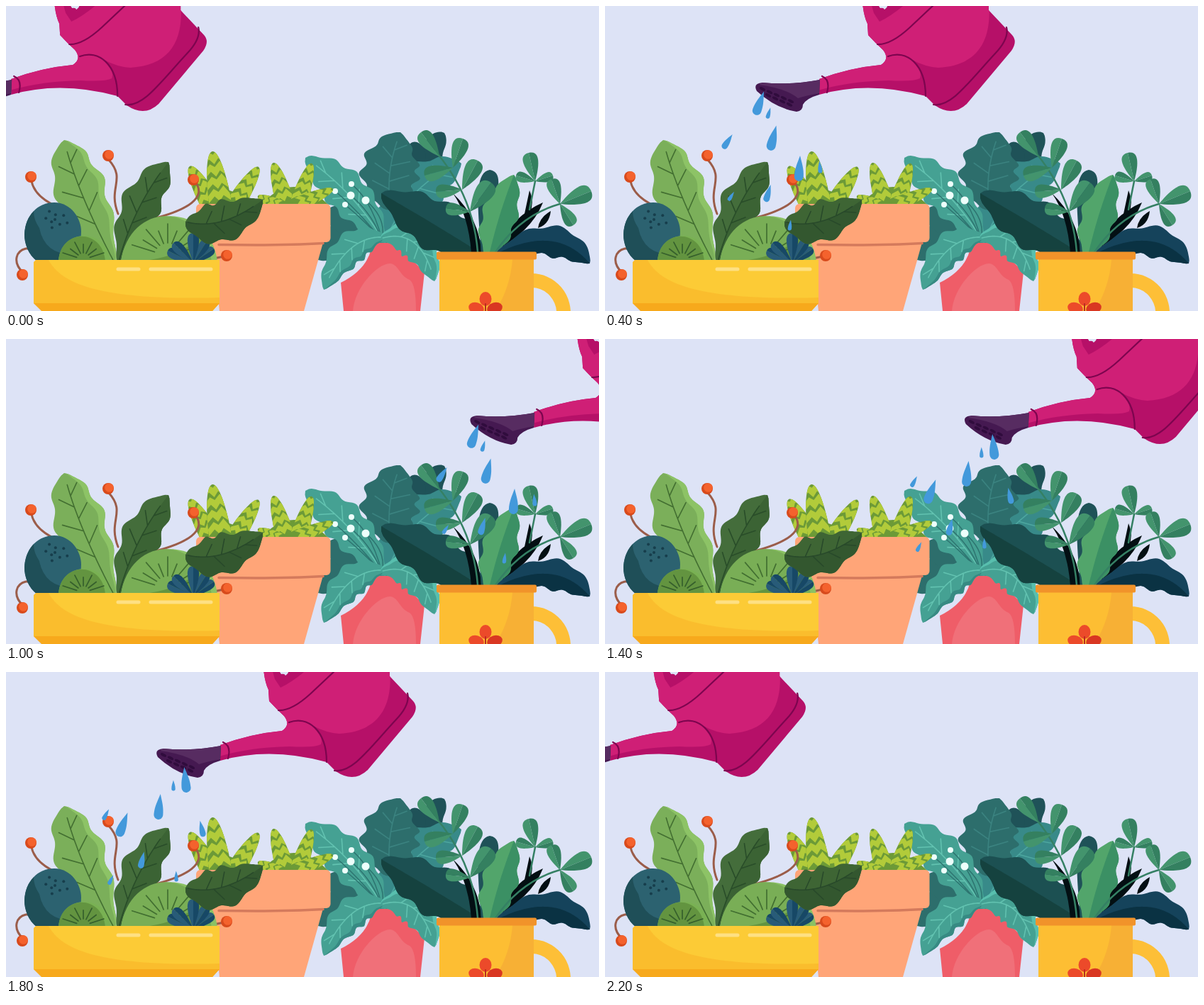
These frames come from a looping animation (836x430 px, 2300 ms). An HTML page:

```html
<!DOCTYPE html>
<html lang="en">
<head>
<meta charset="utf-8">
<title>Watering the plants</title>
<style>
html, body { margin: 0; width: 100%; height: 100%; overflow: hidden; background: #dde3f6; }
svg { display: block; width: 836px; height: 430px; }
</style>
</head>
<body>
<svg id="stage" viewBox="0 0 836 430"></svg>
<script>
const range = n => [...Array(n).keys()];
const repeat = (n, make) => range(n).map(make).join('');
const parse = s => s.split(' ').map(p => p.split(',').map(Number));
const path = (d, fill) => `<path d="${d}" fill="${fill}"/>`;
const line = (d, color, w) => `<path d="${d}" fill="none" stroke="${color}" stroke-width="${w}" stroke-linecap="round"/>`;
const dot = (x, y, r, fill) => `<circle cx="${x}" cy="${y}" r="${r}" fill="${fill}"/>`;
const oval = (x, y, rx, ry, turn, fill) =>
  `<ellipse cx="${x}" cy="${y}" rx="${rx}" ry="${ry}" fill="${fill}" transform="rotate(${turn} ${x} ${y})"/>`;
const rect = (x, y, w, h, r, fill) => `<rect x="${x}" y="${y}" width="${w}" height="${h}" rx="${r}" fill="${fill}"/>`;
const polygon = (points, fill) => path('M' + points.map(p => p.map(v => v.toFixed(1))).join('L') + 'Z', fill);

let clips = 0;
function within(d, base, inner) {
  const id = 'clip' + clips++;
  return `<clipPath id="${id}"><path d="${d}"/></clipPath>${path(d, base)}<g clip-path="url(#${id})">${inner}</g>`;
}

// Lobed leaf along a quadratic spine "base bend tip".
// skew above 1 moves the widest part to the tip; shadeSide 1 is right of the growing direction.
function leaf(spine, width, lobes, fill, { shade, shadeSide = 1, inset = 0, vein, skew = 1, depth = .12 } = {}) {
  const [a, b, c] = parse(spine);
  const at = t => [0, 1].map(k => (1 - t) ** 2 * a[k] + 2 * t * (1 - t) * b[k] + t * t * c[k]);
  const half = t => width * Math.sin(Math.PI * t ** skew) ** .65 * (1 + depth * Math.cos(2 * Math.PI * lobes * t));
  const edge = (t, side, part = 1) => {
    const [p, q, r] = [at(t), at(t - .01), at(t + .01)];
    const [dx, dy] = [r[0] - q[0], r[1] - q[1]];
    const w = side * part * half(t) / Math.hypot(dx, dy);
    return [p[0] - dy * w, p[1] + dx * w];
  };
  const ts = range(61).map(i => i / 60), back = [...ts].reverse();
  let out = polygon([...ts.map(t => edge(t, 1)), ...back.map(t => edge(t, -1))], fill);
  if (shade) out += polygon([...ts.map(t => edge(t, shadeSide)), ...back.map(t => edge(t, shadeSide, inset))], shade);
  if (vein) {
    const side = i => {
      const t = .28 + .1 * i;
      return `M${at(t)}L${edge(t + .1, i % 2 ? 1 : -1, .65)}`;
    };
    out += line(`M${at(.03)}L${ts.slice(3, 54).map(at).join('L')}` + range(6).map(side).join(''), vein, 1.6);
  }
  return out;
}

// Small two-tone leaf growing from a joint to its tip.
function leaflet(x, y, tipX, tipY, light = '#43946d', dark = '#348060', ratio = .27) {
  const len = Math.hypot(tipX - x, tipY - y);
  const turn = Math.atan2(tipX - x, y - tipY) * 180 / Math.PI;
  const half = w => `M0 0C${w * .5} ${-len * .25} ${w * 1.9} ${-len} 0 ${-len}Z`;
  return `<g transform="translate(${x} ${y}) rotate(${turn})">${path(half(-len * ratio), light)}${path(half(len * ratio), dark)}</g>`;
}

// Tapering leaf with bright zigzag bands.
function striped(x, y, tipX, tipY, wide) {
  const len = Math.hypot(tipX - x, tipY - y);
  const turn = Math.atan2(tipX - x, y - tipY) * 180 / Math.PI;
  const shape = `M${-wide} 0C${-wide} ${-len * .5} ${-wide * .6} ${-len} 0 ${-len}S${wide} ${-len * .5} ${wide} 0Z`;
  const band = k => {
    const y0 = -len * (1 - k * .22), h = len * .12;
    return path(`M${-wide} ${y0 + h}L${-wide * .4} ${y0}L0 ${y0 + h * .5}L${wide * .5} ${y0 - h * .3}L${wide} ${y0 + h}V${y0 + h * 2}L${wide * .4} ${y0 + h * 1.1}L0 ${y0 + h * 1.9}L${-wide * .4} ${y0 + h * 1.1}L${-wide} ${y0 + h * 2}Z`, '#b2cb3a');
  };
  return `<g transform="translate(${x} ${y}) rotate(${turn})">${within(shape, '#6c9a37', repeat(4, band))}</g>`;
}

const berry = ([x, y]) => dot(x, y, 8, '#d84a1c') + dot(x + 1.5, y - 1.5, 6.3, '#f4622d');

function fan(x, y, inner, outer, count, color) {
  return line(range(count).map(i => {
    const a = Math.PI * (1.12 + .76 * i / (count - 1));
    const r = i % 2 ? outer * .82 : outer;
    return `M${x + inner * Math.cos(a)} ${y + inner * Math.sin(a)}L${x + r * Math.cos(a) * 1.15} ${y + r * Math.sin(a)}`;
  }).join(''), color, 1.7);
}

function tealPlant() {
  const teal = '#45a193', deep = '#2d6e6c', vein = '#62c2b0';
  const flowers = parse('464,261 478,280 487,251 486,267 507,274');
  return leaf('510,325 470,325 436,356', 24, 2, deep) +
    leaf('545,335 500,310 450,290', 28, 2, deep) +
    leaf('590,265 585,215 618,179', 18, 2, '#1f5258', { skew: 1.5 }) + oval(579, 208, 12, 17, -20, '#1f5258') +
    leaf('530,345 562,250 642,222', 34, 4.5, '#388a89', { vein: '#4da7a0' }) +
    leaf('543,288 533,235 556,178', 39, 4.5, deep, { vein: '#3b8380' }) +
    leaf('534,334 490,260 422,214', 28, 5, teal, { vein, skew: 1.1 }) +
    line(flowers.map(([x, y]) => `M${x} ${y}Q${x + 30} ${y + 25} 530 330`).join(''), '#2d7470', 1.5) +
    flowers.map(([x, y], i) => dot(x, y, i < 3 ? 4 : 5.5, '#edfffb')).join('') +
    path('M472 390Q508 372 515 342Q518 334 526 334H545Q553 334 556 342L590 375L584 430H476Z', '#ef5d68') +
    path('M489 430C492 395 525 363 541 363C554 364 554 380 569 386Q578 392 578 430Z', '#f07079') +
    leaf('534,326 480,322 448,400', 22, 4.5, teal, { shade: '#378a83', shadeSide: -1, inset: .7, vein }) +
    leaf('528,328 585,310 604,388', 23, 4.5, teal, { shade: '#58bfae', shadeSide: -1, inset: .65, vein });
}

function stripedPlants() {
  return path('M272 282Q305 235 343 282Z', '#6c9a37') +
    striped(290, 282, 259, 226, 14) + striped(320, 284, 356, 227, 13) + striped(303, 284, 291, 205, 16) +
    path('M358 282Q405 228 456 282Z', '#6c9a37') +
    striped(395, 282, 377, 221, 13) + striped(411, 282, 431, 222, 12) +
    striped(405, 282, 461, 258, 10) + striped(390, 284, 355, 268, 9);
}

function orangePot() {
  return path('M290 330H448L420 430H301Z', '#ffa578') + rect(268, 279, 189.5, 54, 6, '#ffa578') +
    line('M300 336.5Q390 338 447 334.5', '#d47a5c', 3.5);
}

function leftPlants() {
  const brown = '#9b5d4a';
  const stems = 'M36 247Q40 266 64 279M145 217C170 245 143 255 158 293M266 247C285 270 255 288 207 300' +
    'M24 376C8 360 15 345 28 342Q45 341 60 358M312 352L288 357';
  const seed = i => {
    const a = i * 2.4, r = 6.5 * Math.sqrt(i);
    return dot(69 + r * Math.cos(a), 301 + r * .75 * Math.sin(a), 2, '#173e4c');
  };
  const sprout = (x, y) => leaflet(264, 362, x, y, '#285b78', '#174866', .2);
  return line(stems, brown, 3) +
    leaf('154,364 98,258 82,189', 34, 3.5, '#7baf5a', { shade: '#8dc366', inset: .72, vein: '#436f31', skew: 1.15 }) +
    leaf('158,364 178,285 229,220', 26, 3.5, '#446d3b', { shade: '#3b6334', vein: '#294d29', skew: 1.3, depth: .16 }) +
    within('M68 277C92 277 106 300 106 318Q106 345 86 360H44C31 350 26 335 26 322C27 295 45 277 68 277Z', '#2c6270',
      path('M44 275Q33 292 47 313Q55 352 97 350L80 370H20V280Z', '#1f4f58')) + repeat(9, seed) +
    path('M74 360C76 314 142 310 147 360Z', '#79b153') + path('M74 360C76 314 136 312 140 360Z', '#639440') +
    fan(109, 358, 10, 27, 7, '#36602c') +
    path('M162 360C174 278 286 272 298 360Z', '#8bc164') +
    within('M162 360C174 278 272 272 290 360Z', '#79ae56', path('M182 360Q250 356 280 318V360Z', '#639440')) +
    fan(228, 354, 20, 47, 9, '#426f31') +
    sprout(228, 345) + sprout(236, 334) + sprout(293, 342) + sprout(284, 330) + sprout(264, 320) +
    leaf('253,304 304,318 362,273', 28, 3.5, '#3e6534', { shade: '#33572f', vein: '#28492a', skew: .9 }) +
    parse('35,241 144,211 264,245').map(berry).join('');
}

function planter() {
  return path('M42 358H301V419L291 430H51L39 419V361Z', '#fabd2d') +
    path('M60 358H301V411C150 415 80 397 60 358Z', '#fccb36') +
    path('M39 419H301L291 430H50Z', '#f7a91c') +
    line('M158 371H187M204 371H289', '#fee083', 5) + parse('23,379 311,352').map(berry).join('');
}

function rightPlants() {
  const stem = '#358064', black = '#030f13';
  // Pairs of leaves climb the left stem, turning as they go up.
  const pair = k => {
    const [x, y] = [654 - 10 * k - k * k, 290 - 31 * k];
    return leaflet(x, y, x - 34 - 3 * k, y - 5 + 8 * k) + leaflet(x, y, x + 30 - 8 * k, y - 41);
  };
  const trio = (x, y, tips) => parse(tips).map(([tx, ty]) => leaflet(x, y, tx, ty)).join('');
  return leaf('675,352 612,312 529,264', 34, 4, '#1c5052', { shade: '#15423f', shadeSide: -1 }) +
    path('M630 264Q668 300 670 348H656Q652 295 630 264Z', black) +
    path('M757 277Q740 320 684 348Q715 295 757 277Z', black) +
    path('M768 289Q766 308 750 313Q752 298 768 289ZM738 260Q749 285 728 307Z', black) +
    path('M682 231C706 235 690 270 675 349H670C666 290 658 235 682 231Z', '#1f5258') +
    leaf('680,356 692,300 716,238', 24, 3.5, '#52a56b', { shade: '#3b9064' }) +
    leaf('690,350 775,306 823,363', 21, 3.5, '#15435b', { shade: '#0a3243', skew: 1.2 }) +
    line('M605 204Q659 268 665 347M746 247L738 287M781 279Q725 295 690 347', stem, 2.5) +
    repeat(3, pair) + leaflet(611, 212, 585, 178) +
    trio(746, 247, '737,207 719,239 771,239') + trio(781, 279, '769,244 825,261 800,309');
}

function mug() {
  return line('M735 387H741A45 46 0 0 1 785.500 440', '#fdbf37', 20) +
    rect(611, 350, 133, 85, 0, '#fdbe33') + path('M714 357H744V430H690Q711 397 714 357Z', '#f7b035') +
    rect(607, 346.5, 141, 11, 2, '#f1932a') +
    oval(676, 413, 8.500, 10, 0, '#ec4a2a') + oval(663, 426, 11, 8, 18, '#ec4a2a') + oval(689, 426, 11, 8, -18, '#d93722') +
    line('M676 420V431', '#b82b21', 2);
}

function wateringCan() {
  const pink = '#cf1f76', deep = '#b61068', seam = '#7d054f';
  const body = 'M363 -4Q365 15 370 25L371 41Q382 53 392 62Q402 75 389 83Q345 87 302 103V125Q372 105 452 127L465 140Q490 157 510 138L573 63Q582 50 574 41L541 6V-4Z';
  const light = 'M360 -6H541C546 50 525 84 470 87Q452 86 433 76Q448 90 444 102Q435 107 400 105Q345 106 300 119V95L360 60Z';
  const hole = i => {
    const k = i % 5, row = i > 4;
    return oval(222 + 10 * k + 8 * row, 117 + 4.3 * k + 9 * row, 4.5, 2, 28, '#300c3d');
  };
  return within(body, deep, path(light, pink) + path('M375 -4L379 10L387 22Q404 14 425 -4Z', deep)) +
    path('M386 0L388 3Q393 2 394 5Q398 2 398 0Z', '#dde3f6') +
    line('M384 54Q403 55 430 30L464 -2M399 71C425 61 452 82 452 127M463 139C488 143 512 108 550 67Q570 46 566 30M306 99Q318 104 313 122', seam, 2.2) +
    path('M303 104Q260 112 222 108Q208 109 214 120Q240 144 270 149Q279 148 279 139Q284 130 302 125Z', '#451951') +
    path('M303 104Q260 112 222 108L217 111Q255 116 272 130Q285 126 302 123Z', '#572c61') + repeat(9, hole);
}

// Drops lean more the farther they are left of the upright position.
function spray(drops, upright) {
  return parse(drops).map(([x, y, h]) => {
    const r = h * .18, b = h / 2;
    return `<path transform="translate(${x} ${y}) rotate(${(upright - x) * .3})" fill="#4399db" d="M0 ${-b}C${r * .5} ${-b * .4} ${r} 0 ${r} ${b - r}A${r} ${r} 0 0 1 ${-r} ${b - r}C${-r} 0 ${-r * .5} ${-b * .4} 0 ${-b}Z"/>`;
  }).join('');
}
const rightward = spray('218,137,35 231,151,16 237,186,36 173,191,24 274,229,36 303,227,17 178,268,15 230,264,25 261,309,15', 285);
const leftward = spray('253,152,36 236,160,15 216,190,36 141,201,17 165,215,36 276,221,23 192,265,24 148,293,15 240,288,15', 235);

const stage = document.getElementById('stage');
stage.innerHTML = rect(0, 0, 836, 430, 0, '#dde3f6') +
  tealPlant() + stripedPlants() + orangePot() + leftPlants() + planter() + rightPlants() + mug() +
  `<g id="can">${wateringCan()}</g><g id="right">${rightward}</g><g id="left">${leftward}</g>`;
const [can, right, left] = ['can', 'right', 'left'].map(id => document.getElementById(id));

const shift = (group, x) => group.setAttribute('transform', `translate(${x} 0)`);

// The can sweeps right and back in 100 ms steps; its spray changes on the way back.
function draw(time) {
  const step = Math.floor(time % 2300 / 100);
  const canX = (Math.min(step, 22 - step) - 4) * 73.7;
  const goingRight = step <= 12;
  const sprayX = step <= 6 ? (step - 4) * 77 : step <= 11 ? 154 + (step - 6) * 72 : canX;
  shift(can, canX);
  shift(right, sprayX);
  shift(left, canX);
  right.style.display = goingRight ? '' : 'none';
  left.style.display = goingRight ? 'none' : '';
}
function tick(now) {
  draw(now);
  requestAnimationFrame(tick);
}
draw(0);
requestAnimationFrame(tick);
</script>
</body>
</html>
```
